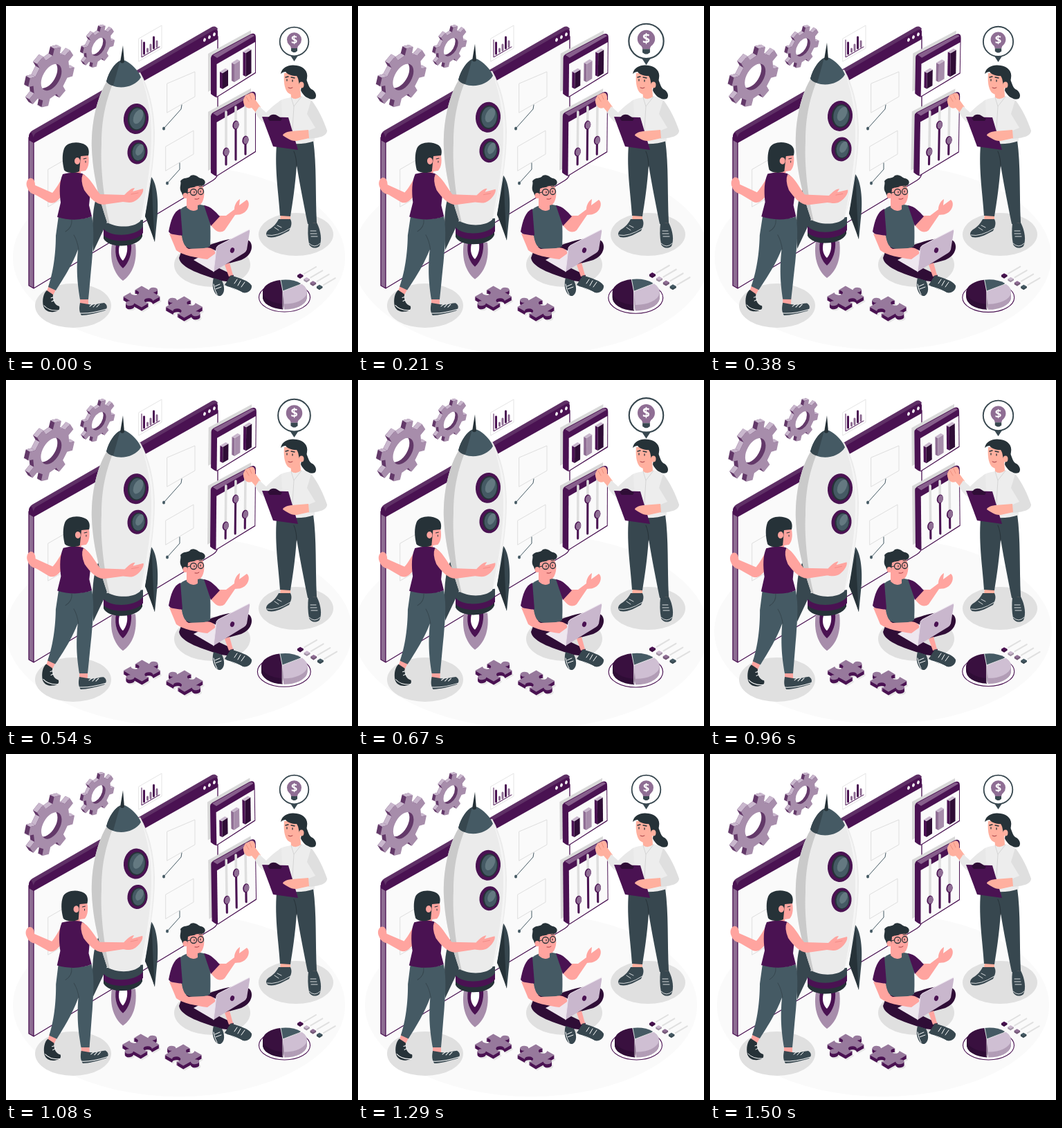
An HTML page with a canvas for the animation above (1.54 s loop, 500x500 px).

```html
<!DOCTYPE html>
<html lang="en">
<head>
<meta charset="utf-8">
<title>Rocket launch team</title>
<style>
html, body { margin: 0; width: 100%; height: 100%; overflow: hidden; background: #fff; }
canvas { display: block; width: 500px; height: 500px; }
</style>
</head>
<body>
<canvas id="stage" width="500" height="500"></canvas>
<script>
const ctx = document.getElementById('stage').getContext('2d');
const LOOP = 1540, CYCLE = 1500, TAU = Math.PI * 2;
const PLUM = '#4a1252', NIGHT = '#2f0d36', MAUVE = '#8f6e94', LILAC = '#a78dab', PALE = '#c9b7cd';
const SLATE = '#455a64', STEEL = '#37474f', INK = '#263238', SKIN = '#ffa49f', PEACH = '#ffb09f';

const paths = new Map();
function path(d) {
  if (!paths.has(d)) paths.set(d, new Path2D(d));
  return paths.get(d);
}
function fill(color, d) {
  ctx.fillStyle = color;
  ctx.fill(path(d));
}
function line(color, width, d) {
  ctx.strokeStyle = color;
  ctx.lineWidth = width;
  ctx.stroke(path(d));
}
function oval(color, x, y, rx, ry = rx, angle = 0, stroke = 0) {
  ctx.beginPath();
  ctx.ellipse(x, y, rx, ry, angle, 0, TAU);
  if (stroke) {
    ctx.strokeStyle = color;
    ctx.lineWidth = stroke;
    ctx.stroke();
  } else {
    ctx.fillStyle = color;
    ctx.fill();
  }
}
// Draws a group scaled and turned around a pivot.
function about(x, y, scale, angle, draw) {
  ctx.save();
  ctx.translate(x, y);
  ctx.rotate(angle);
  ctx.scale(scale, scale);
  ctx.translate(-x, -y);
  draw();
  ctx.restore();
}
function shifted(dx, dy, draw) {
  ctx.save();
  ctx.translate(dx, dy);
  draw();
  ctx.restore();
}
// Linear interpolation between [position, value] stops.
function tween(stops, p) {
  const i = Math.max(1, stops.findIndex(s => s[0] >= p));
  const [a, u] = stops[i - 1], [b, v] = stops[i];
  return u + (v - u) * (p - a) / (b - a);
}

const BEAT = [[0, 0], [.14, 1], [.28, 0], [.42, 1], [.7, 0], [1, 0]];
const SHAKE = Array.from({ length: 11 }, (_, i) => [i / 10, i % 10 ? (i % 2 ? -1 : 1) : 0]);
const FLOAT = [[0, 0], [.5, -8], [1, 0]];
const SWING = [[0, 0], [.25, 1], [.75, -1], [1, 0]];

function gear(x, y, r, depth) {
  const rim = [];
  for (let i = 0; i < 8; i++) {
    for (const [a, m] of [[0, .77], [.07, 1], [.45, 1], [.52, .77]]) {
      const t = (i + a + .1) / 8 * TAU, u = Math.cos(t) * r * m, v = Math.sin(t) * r * m;
      rim.push([x + .866 * u, y + v - .5 * u]);
    }
  }
  const face = (color, k) => shifted(-k, -k * .55, () => {
    ctx.beginPath();
    rim.forEach(p => ctx.lineTo(...p));
    ctx.closePath();
    ctx.save();
    ctx.transform(.866, -.5, 0, 1, x, y);
    ctx.moveTo(r * .44, 0);
    ctx.arc(0, 0, r * .44, 0, TAU);
    ctx.restore();
    ctx.fillStyle = color;
    ctx.fill('evenodd');
  });
  for (let k = depth; k > 0; k--) face('#633969', k);
  // Sides that face upwards catch the light.
  rim.forEach(([ax, ay], i) => {
    const [bx, by] = rim[(i + 1) % rim.length];
    if (bx - ax < Math.abs(by - ay) * .3) return;
    ctx.beginPath();
    ctx.moveTo(ax, ay);
    ctx.lineTo(bx, by);
    ctx.lineTo(bx - depth, by - depth * .55);
    ctx.lineTo(ax - depth, ay - depth * .55);
    ctx.fillStyle = PALE;
    ctx.fill();
  });
  face(LILAC, 0);
}

function puzzle(x, y, tabs) {
  const h = 15.500;
  for (let k = 7; k >= 0; k--) {
    const shadow = k > 5;
    ctx.save();
    ctx.transform(.866, .5, -.866, .5, x + (shadow ? 2 : 0), y + k);
    ctx.beginPath();
    for (const out of tabs) {
      ctx.lineTo(-h, -h);
      if (out > 0) ctx.arc(0, -h - 4, 5, 2.3, .84);
      else ctx.arc(0, -h + 4, 5, -2.3, -.84, true);
      ctx.rotate(TAU / 4);
    }
    ctx.fillStyle = shadow ? '#e6e6e6' : k ? PLUM : '#97799c';
    ctx.fill();
    ctx.restore();
  }
}

function floorShadows() {
  oval('#e0e0e0', 97, 433, 55, 32);
  oval('#e0e0e0', 298, 374, 55, 32);
  oval('#e0e0e0', 419, 330, 54, 31);
}

function browserWindow() {
  fill('#8e6d93', 'M33 188L40 193V408L33 404Z');
  fill('#fafafa', 'M40 197L306 46V241Q306 248 300 252L40 408Z');
  line(PLUM, 1.3, 'M33 190V404L40 408L299 252Q306 248 306 240V44M40 195V408');
  fill('#5f3066', 'M33 190Q33 183 38 180L298 30Q303 28 306 33L300 44L40 196Z');
  fill(PLUM, 'M40 198V190Q40 186 44 183L300 35Q306 32 306 37V48Z');
  fill(PLUM, 'M33 189Q33 183 37 183L40 190V198L33 194Z');
  for (let i = 0; i < 3; i++) oval('#fff', 287 + i * 7, 49 - i * 4, 1.8, 2.7, .3);
  line('#dedede', 1, 'M233 112L273 95V131L233 154ZM231 203L271 180V214L231 238ZM61 236L101 213V267L61 290Z');
  line(SLATE, 1, 'M254 143L253 149L228 177M251 227V236L233 256');
  oval(SLATE, 228, 177, 2, 2.5);
  oval(SLATE, 233, 256, 2, 2.5);
}

function chartCard() {
  fill('#fff', 'M192 47L225 28V61L192 80Z');
  line('#e5e5e5', 1, 'M192 47L225 28V61L192 80Z');
  line(PLUM, 1, 'M196 49V74L222 59');
  line(PLUM, 3, 'M199.500 53V69M213.500 45V61');
  line(MAUVE, 3, 'M204.500 62V66M209 56V64M218 51V59');
}

function panelFrame(b) {
  fill('#d8d8d8', `M292 69L354 35V${b - 42}L292 ${b - 8}Z`);
  fill(PLUM, `M296 75Q296 72 299 70L353 41Q361 37 361 46V${b - 35}L305 ${b}Q302 ${b} 296 ${b - 5}Z`);
  fill('#875f8c', 'M299 71L353 42Q357 40 359 43L305 75Z');
  fill('#fafafa', `M304.500 84L360 52V${b - 36}L304.500 ${b - 1}Z`);
}

function column(x, y, height, front, side) {
  fill(side, `M${x} ${y}l4 2v${height}l-4 -2Z`);
  fill(front, `M${x + 4} ${y + 2}l8 -5v${height}l-8 5Z`);
  fill(PALE, `M${x} ${y}l8 -5l4 2l-8 5Z`);
}

function panels() {
  panelFrame(132);
  column(309, 95, 23, NIGHT, PLUM);
  column(326, 82, 26, LILAC, MAUVE);
  column(342.500, 66, 34, NIGHT, PLUM);
  shifted(0, 84, () => panelFrame(162));
  [[318, 211, 153, 229], [332, 172, 146, 222], [346, 194, 138, 214]].forEach(([x, knob, top, end]) => {
    line('#dedede', 3.5, `M${x} ${top}V${end}`);
    line(PLUM, 3, `M${x} ${knob}V${end}`);
    oval(PLUM, x, knob, 4.5, 6.5, .2);
    oval(MAUVE, x + .7, knob, 3.6, 5.4, .2);
  });
}

function porthole(x, y, rx, ry) {
  oval(PLUM, x, y, rx, ry, .1);
  oval(INK, x + 1, y, rx * .73, ry * .78, .1);
  oval(SLATE, x + 1.5, y, rx * .62, ry * .7, .1);
  oval('#647981', x + 3, y - 3, rx * .34, ry * .5, .45);
}

function rocket() {
  fill(LILAC, 'M153 344C149 369 157 388 169 397C183 387 190 369 187 344Z');
  fill(PLUM, 'M159 344C156 361 162 373 169 379C178 371 182 357 181 344Z');
  fill('#fff', 'M164 346C161 357 165 365 169 368C174 362 176 354 175 346Z');
  fill(STEEL, 'M139 260C126 277 123 306 126 355L143 319L150 302Z');
  fill(STEEL, 'M210 247C219 258 220 285 219 300L215 341C211 327 207 312 201 304Z');
  fill(INK, 'M211 252Q211 280 215 341Q205 313 201 304Z');
  fill(INK, 'M141 318V336C148 351 190 350 197 333V315Z');
  fill(PLUM, 'M141 319V331C151 343 187 342 198 328V315Z');
  fill(STEEL, 'M141 314V322C151 335 188 333 198 319V309Z');
  fill('#ebebeb', 'M145 110C129 138 123 174 124 207C126 249 136 282 146 312C158 321 184 321 194 311C207 273 215 226 215 183C214 147 207 119 194 96Z');
  fill('#cacaca', 'M145 110C129 138 123 174 124 207C126 249 136 282 146 312L150 315C142 283 136 235 138 200C138 162 145 136 154 113Z');
  fill('#f5f5f5', 'M194 99C209 130 214 162 213 190C213 232 204 280 194 310C204 264 211 220 210 180Q208 134 194 99Z');
  fill(SLATE, 'M145 109C149 94 157 83 165 79Q171 77 176 81C185 87 192 95 195 103C185 120 156 122 145 109Z');
  fill(STEEL, 'M145 109C149 94 157 83 165 79L155 115Q148 114 145 109Z');
  fill(INK, 'M169 57L171 81Q168 84 165 81Z');
  porthole(188, 163, 18, 22);
  porthole(190, 211, 14.500, 17.500);
}

function pushingWoman() {
  fill(SKIN, 'M84 244C78 253 74 262 67 270L42 259C42 251 38 248 34 249C30 251 28 257 31 263C33 269 38 272 43 273L62 284C70 287 75 281 81 274Z');
  fill(SKIN, 'M62 403L73 408L67 420L58 416ZM107 420H119V433H107Z');
  fill(INK, 'M59 411C54 415 52 425 54 434C56 440 62 443 69 442C77 441 78 438 77 434C70 432 67 425 68 417Z');
  fill(STEEL, 'M107 429L119 431C128 433 136 429 142 429C147 432 147 437 143 440C130 444 118 447 109 447C105 441 106 435 107 429Z');
  line('#fff', 1, 'M107 444Q123 445 145 438M121 434l4 -3M126 435l4 -4M131 435l4 -4M55 433Q62 441 76 440M65 422l3 -1M66 427l4 -2');
  fill(SLATE, 'M76 303C90 309 112 309 124 304C128 325 126 345 124 370C122 390 121 405 119 424L107 424C104 405 101 385 104 352C97 370 89 385 72 411L61 406C70 380 72 350 72 332Z');
  line(STEEL, 1, 'M105 352Q103 339 98 331M95 309Q96 320 86 326');
  fill(SKIN, 'M100 215L118 212C121 222 120 233 115 238L108 239V248H92V233Z');
  fill(PLUM, 'M82 243Q97 239 110 242C117 246 120 251 123 259L120 288L124 304C110 310 90 310 74 305L79 284C77 268 77 254 82 243Z');
  fill(SKIN, 'M111 243C121 247 127 261 136 272L171 273C176 268 181 263 186 263L183 268L198 264C200 269 192 280 184 283C178 285 173 283 169 283L141 287C130 287 120 276 113 266Q107 252 111 243Z');
  line('#ef8580', .8, 'M181 272l10 -2');
  fill(INK, 'M84 206C88 196 106 195 115 201C121 205 120 213 119 216L108 217L106 239C98 243 87 241 84 237C81 225 81 214 84 206Z');
  oval(SKIN, 103, 224, 4, 5);
  line(INK, 1, 'M112 221l4 -1M115 224v2');
}

function seatedMan() {
  fill(SKIN, 'M308 303L318 303L330 294C330 288 333 282 338 279L337 288L348 280C353 284 351 293 345 298C338 303 334 301 331 302L316 324C307 331 300 322 294 314Z');
  fill(NIGHT, 'M256 348L250 364C252 379 285 389 311 397L326 399L329 389L304 377L340 367C357 360 358 344 351 339C340 331 310 339 295 345Z');
  fill(SKIN, 'M316 374L323 371L328 389L322 391Z');
  fill(STEEL, 'M300 393L312 397C316 405 317 415 310 419C302 420 296 407 300 393Z');
  fill(STEEL, 'M325 389C338 394 350 396 355 404C356 411 348 416 342 414C334 410 324 408 316 403Z');
  line('#fff', 1, 'M302 405l7 -3M303 409l8 -3M330 401l4 -6M335 404l4 -7M340 406l5 -7M305 417Q301 410 300 402M321 406Q333 409 341 414');
  fill(SLATE, 'M250 296C260 285 277 285 289 289C296 297 296 330 295 347C283 355 262 352 257 345C250 325 247 305 250 296Z');
  fill(PLUM, 'M252 293C242 297 238 310 235 326C240 333 250 333 255 331Z');
  fill(PLUM, 'M286 288C297 290 302 297 309 304L296 318C293 308 290 300 286 288Z');
  fill(SKIN, 'M258 262L282 257C288 264 288 280 281 287L277 288V294Q269 299 261 291V278Z');
  fill(INK, 'M254 270C249 263 254 258 252 253C257 246 263 251 267 245C274 242 277 248 282 249C290 251 289 259 283 260C276 259 269 262 263 264L262 276C257 276 255 274 254 270Z');
  oval(SKIN, 259, 274, 3.500, 4);
  oval(INK, 271, 269, 4.500, 4.500, 0, 1.3);
  oval(INK, 281.500, 268, 4, 4.500, 0, 1.3);
  line(INK, 1.2, 'M262 270L266 269M268 262l5 -1M279 261l4 0M272 268v2M281 267v2');
  line('#a53c43', 1, 'M273 279q4 1 6 -1');
  fill('#eee7ef', 'M271 367L300 352L321 363L300 384Z');
  fill(SKIN, 'M236 329L254 332C255 340 258 348 264 351L286 350C297 347 304 354 302 358L291 366C275 364 255 360 246 353Z');
  fill(PALE, 'M304 351Q304 348 307 346L350 324Q353 323 352 327L348 352Q347 355 344 357L300 384Z');
  line('#ebe1ed', 1, 'M300 384L304 350Q304 348 307 346L352 323');
  oval(PLUM, 327, 353, 3, 4, .3);
}

function standingWoman() {
  fill(INK, 'M429 103C437 105 435 115 441 120C448 123 450 131 446 134C439 137 430 131 426 122Z');
  fill(PEACH, 'M397 300H411V311H396ZM437 310H449V318H437Z');
  fill(STEEL, 'M394 308L411 308C414 314 412 319 409 325C398 331 388 336 379 334C374 331 376 326 380 323C387 319 391 314 394 308Z');
  fill(STEEL, 'M437 314L449 313C455 325 457 338 453 347C447 352 440 349 438 344C436 334 436 324 437 314Z');
  line('#fff', .8, 'M377 331Q391 334 411 321M438 343Q446 351 454 343M388 320l6 4M392 317l6 3M440 325h8M440 329h9M441 333h9');
  fill(STEEL, 'M392 192C410 200 430 200 444 194C449 230 447 270 449 313L436 315C430 285 425 260 420 230C418 260 414 285 411 304L396 303C394 270 387 230 392 192Z');
  line(INK, 1, 'M420 232Q420 219 416 210');
  fill('#ededed', 'M394 138C404 131 416 133 425 130C438 131 446 138 448 150L446 195C430 201 405 200 391 195Z');
  fill(PEACH, 'M361 154L355 147C348 150 342 143 343 135L346 129L353 126C358 124 361 129 360 135L368 146Z');
  line('#e78373', .7, 'M347 131l4 7M352 128l3 7');
  fill('#e8e8e8', 'M398 136C388 142 382 148 376 154L366 145L360 154C366 164 372 171 380 171L399 158Z');
  fill(PEACH, 'M411 121L425 116L426 131Q419 137 412 132Z');
  fill(PEACH, 'M402 97L425 95C428 105 426 118 423 125C420 130 412 129 407 125C402 119 401 108 402 97Z');
  fill(INK, 'M397 98C399 87 411 84 420 86C430 87 437 95 435 104C434 113 430 119 426 118C422 112 424 106 420 101C413 101 407 99 404 95Q400 95 397 98Z');
  oval(PEACH, 427, 114, 3.500, 4.500);
  line(INK, 1.3, 'M404 103l4 -1M412 103l5 1M406 106v2M414 107v2');
  line('#a53c43', 1, 'M408 118q3 2 6 0');
  line('#d5d5d5', 1, 'M412 132L416 145L427 131M416 145L413 194');
  fill(PLUM, 'M370 160L408 161L422 208L386 203Z');
  fill(NIGHT, 'M378 162L382 158Q388 155 393 159L399 163L397 166L381 166Z');
  fill('#dfdfdf', 'M441 136C452 149 459 166 464 180C464 188 452 191 437 192L435 181L447 176L435 156Z');
  fill(PEACH, 'M437 179L412 181C404 182 400 185 400 187C405 190 412 196 420 195L438 191Z');
}

function ideaBubble() {
  fill(STEEL, 'M410 70H423L416.500 80Z');
  oval('#fff', 416.500, 51.500, 20.800);
  oval(STEEL, 416.500, 51.500, 20.800, 20.800, 0, 1.8);
  fill(MAUVE, 'M412 61Q412 58 409 56A10.500 10.500 0 1 1 424 56Q421 58 421 61Z');
  fill(STEEL, 'M412 61H421V65L418 67H415L412 65Z');
  ctx.fillStyle = '#fff';
  ctx.font = 'bold 16px "Open Sans", sans-serif';
  ctx.textAlign = 'center';
  ctx.fillText('$', 416.500, 54);
}

function slice(color, from, to, dy = 0) {
  ctx.beginPath();
  ctx.moveTo(400, 412 + dy);
  ctx.ellipse(403, 413 + dy, 32, 17.500, 0, from, to);
  ctx.fillStyle = color;
  ctx.fill();
}

function pieChart() {
  oval('#fff', 402.500, 421, 37, 21);
  oval(PLUM, 402.500, 421, 37, 21, 0, 1.1);
  for (let dy = 8; dy >= 0; dy--) {
    slice(dy ? NIGHT : '#39103f', 1.65, 4.5, dy);
    slice(dy ? '#b29db6' : '#cfbfd3', -.7, 1.6, dy);
    slice(dy ? STEEL : SLATE, 4.5, 5.52, dy);
  }
  line('#fff', .8, 'M397 396L400 412L426 402M400 412V437');
  [PLUM, PALE, MAUVE, SLATE].forEach((color, i) => shifted(i * 9.3, i * 5.4, () => {
    fill(color, 'M421 389L425 386.500L429.500 389V391L425 394L421 391.500Z');
    fill('#0003', 'M421 389L425 391.500L429.500 389V391L425 394L421 391.500Z');
    line('#e0e0e0', 2, 'M431 387L448 377');
  }));
}

function render(now) {
  const phase = Math.min(1, now % LOOP / CYCLE);
  const beat = tween(BEAT, phase), swing = tween(SWING, phase) * TAU / 360;

  ctx.fillStyle = '#fff';
  ctx.fillRect(0, 0, 500, 500);
  about(250, 363, 1 + beat * .075, 0, () => oval('#fafafa', 250, 363, 240, 132));
  floorShadows();
  browserWindow();
  chartCard();
  about(327, 140, 1, swing, panels);
  about(92, 87, 1, swing, () => {
    gear(65.500, 103, 39, 6);
    gear(134, 59, 27, 4);
  });
  shifted(0, tween(FLOAT, phase), rocket);
  about(114, 321, 1, swing, pushingWoman);
  shifted(tween(SHAKE, phase) * 2.2, 0, () => {
    puzzle(196, 420, [1, -1, 1, -1]);
    puzzle(257.500, 435, [-1, 1, -1, 1]);
  });
  about(421, 408, 1 + beat * .066, 0, pieChart);
  seatedMan();
  standingWoman();
  about(416.500, 54.500, 1 + beat * .21, 0, ideaBubble);
  requestAnimationFrame(render);
}

ctx.lineCap = ctx.lineJoin = 'round';
requestAnimationFrame(render);
</script>
</body>
</html>
```
